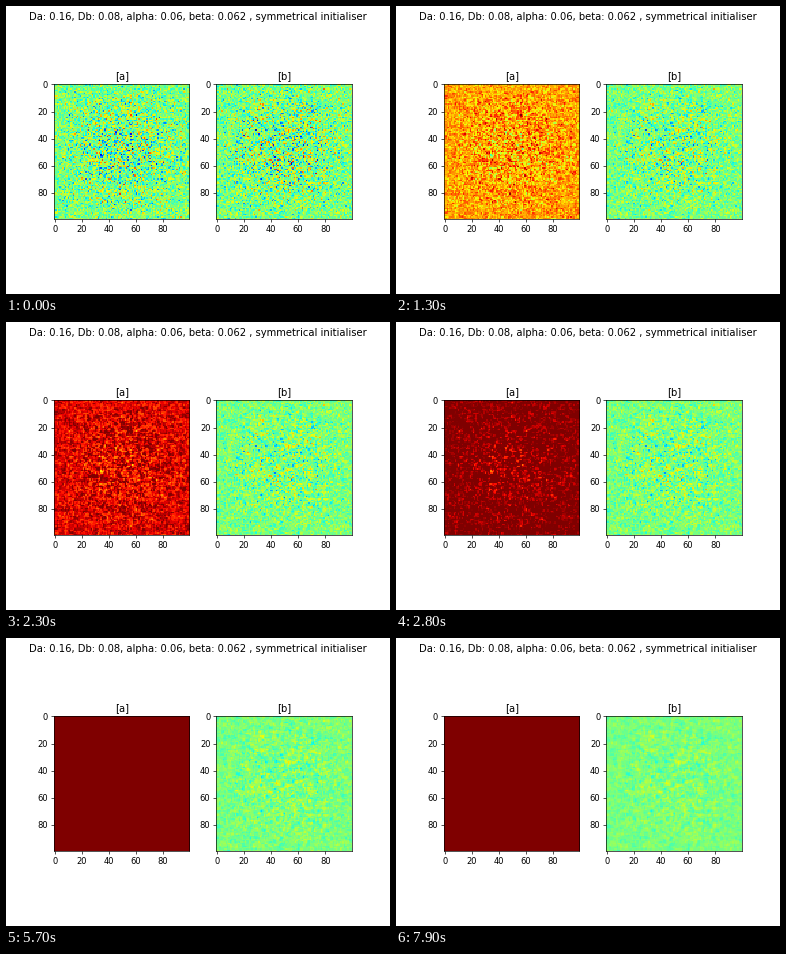
A matplotlib script that plays this animation: 384x288 px, repeating every 8 s.

```python
import numpy as np
import matplotlib.pyplot as plt
from matplotlib.animation import FuncAnimation

N = 100
FRAMES = 80
DA, DB, ALPHA, BETA = 0.16, 0.08, 0.06, 0.062
DT = 0.05
LIMIT = 0.08

# Random start, strongest in the middle of the field
rng = np.random.default_rng(7)
bump = np.sin(np.pi * (np.arange(N) + 0.5) / N)
spread = 0.0115 + 0.0125 * np.outer(bump, bump)
start_a = np.fft.fft2(rng.normal(size=(N, N)) * spread)
start_b = np.fft.fft2(rng.normal(size=(N, N)) * spread)

wave = 2 - 2 * np.cos(2 * np.pi * np.fft.fftfreq(N))
laplace = wave[:, None] + wave[None, :]


def diffuse(spectrum, rate, t):
    return np.fft.ifft2(spectrum * np.exp(-rate * laplace * t)).real


def field_a(t):
    """Diffusion plus feed towards 1."""
    fade = np.exp(-ALPHA * t)
    return 1 - fade + fade * diffuse(start_a, DA, t)


def field_b(t):
    """Diffusion plus decay towards 0."""
    return np.exp(-BETA * t) * diffuse(start_b, DB, t)


plt.rcParams.update({"font.family": "DejaVu Sans", "font.size": 10})
fig, axes = plt.subplots(1, 2, figsize=(6.4, 4.8), dpi=60)
fig.suptitle(f"Da: {DA}, Db: {DB}, alpha: {ALPHA}, beta: {BETA} , "
             "symmetrical initialiser", fontsize=12)

fields = (field_a, field_b)
images = []
for ax, field, name in zip(axes, fields, "ab"):
    images.append(ax.imshow(field(0), cmap="jet", vmin=-LIMIT, vmax=LIMIT,
                            interpolation="nearest"))
    ax.set_title(f"[{name}]", fontsize=12)
    ax.set_xticks(range(0, N, 20))
    ax.set_yticks(range(0, N, 20))


def update(i):
    for image, field in zip(images, fields):
        image.set_data(field(i * DT))
    return images


anim = FuncAnimation(fig, update, frames=FRAMES, interval=100,
                     repeat=True, repeat_delay=0)
plt.show()
```
